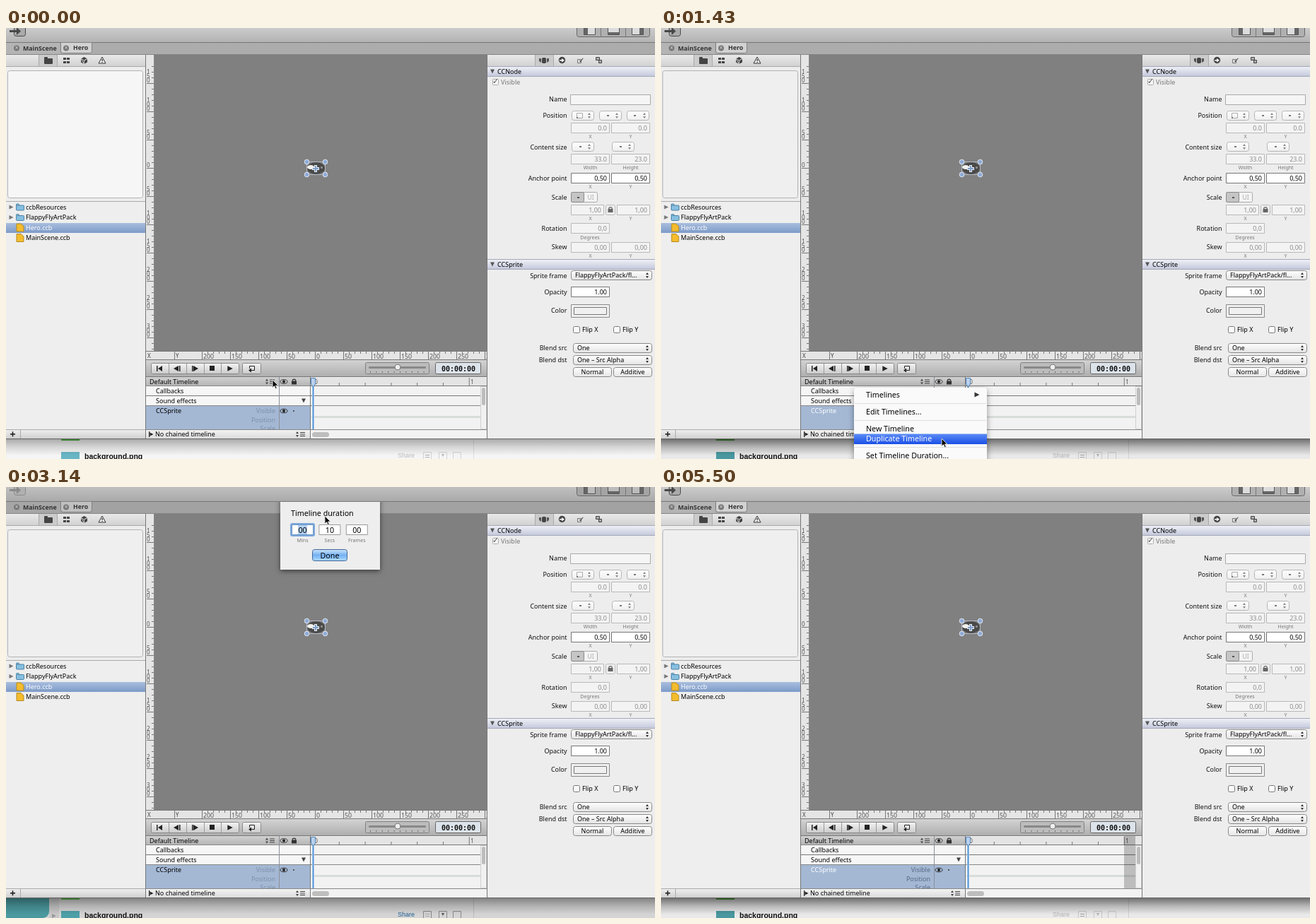
These frames come from a looping animation (918x610 px, 5.84 s). An HTML page with a canvas:

```html
<!DOCTYPE html>
<html lang="en">
<head>
<meta charset="utf-8">
<title>Timeline duration</title>
<style>
html, body { margin: 0; width: 100%; height: 100%; overflow: hidden; background: #eee; }
canvas { display: block; width: 918px; height: 610px; }
</style>
</head>
<body>
<canvas id="stage" width="918" height="610"></canvas>
<script>
const c = document.getElementById('stage').getContext('2d');
const LOOP = 5840;
const SANS = '"Noto Sans", "Open Sans", sans-serif';

// Stepped motion: [time, ...values]
const cursorSteps = [
  [0, 377, 498], [1080, 377, 501], [1260, 383, 515], [1350, 392, 541],
  [1430, 397, 581], [1520, 398, 584], [1600, 398, 590], [1690, 397, 596],
  [1780, 396, 600], [1950, 396, 601], [2580], [3050, 474, 114],
  [3140, 451, 41], [3230, 455, 50], [3310, 458, 57], [3570, 463, 68],
  [3660, 470, 84], [3750, 477, 100], [3840, 481, 110], [4010, 479, 110],
  [4100, 473, 106], [4190, 466, 100], [4280, 462, 97], [4890, 464, 106],
  [4980, 464, 119], [5120, 462, 220], [5210, 455, 380], [5300, 440, 540], [5400]
];
const menuSteps = [[0, 0], [630, 1], [2400, .45], [2490, .1], [2580, 0]];
const pickSteps = [[0, -1], [1260, 0], [1350, 1], [1430, 3], [1690, 4]];
const sheetSteps = [[0, 0], [2820, .5], [2910, 1], [4450, .9], [4540, .6], [4620, .25], [4710, 0]];
const at = (steps, t) => steps.filter(s => s[0] <= t).pop().slice(1);

function box(x, y, w, h, fill, line, r = 0) {
  c.beginPath();
  const o = line ? .5 : 0;
  c.roundRect(x + o, y + o, w - 2 * o, h - 2 * o, r);
  if (fill) { c.fillStyle = fill; c.fill(); }
  if (line) { c.strokeStyle = line; c.lineWidth = 1; c.stroke(); }
}
function shade(y, h, ...colors) {
  const g = c.createLinearGradient(0, y, 0, y + h);
  colors.forEach((k, i) => g.addColorStop(i / (colors.length - 1), k));
  return g;
}
const bar = (x, y, w, h, a, b) => box(x, y, w, h, shade(y, h, a, b));
function text(s, x, y, color = '#000', size = 9, align = 'left', font = SANS, weight = '') {
  c.font = `${weight} ${size}px ${font}`;
  c.textAlign = align;
  c.fillStyle = color;
  c.fillText(s, x, y + size * .35);
}
function poly(points, fill, line) {
  c.beginPath();
  for (let i = 0; i < points.length; i += 2) c.lineTo(points[i], points[i + 1]);
  c.closePath();
  if (fill) { c.fillStyle = fill; c.fill(); }
  if (line) { c.strokeStyle = line; c.lineWidth = 1; c.stroke(); }
}
function dot(x, y, r, fill, line) {
  c.beginPath();
  c.arc(x, y, r, 0, 7);
  if (fill) { c.fillStyle = fill; c.fill(); }
  if (line) { c.strokeStyle = line; c.lineWidth = 1; c.stroke(); }
}
const right = (x, y, s, color = '#222') => poly([x - s, y - s, x + s, y, x - s, y + s], color);
const down = (x, y, s, color = '#444') => poly([x - s, y - s, x + s, y - s, x, y + s], color);
function updown(x, y, color = '#444') {
  poly([x - 2, y - 1, x, y - 4, x + 2, y - 1], color);
  poly([x - 2, y + 1, x, y + 4, x + 2, y + 1], color);
}
function listIcon(x, y) {
  updown(x, y);
  for (let i = -3; i <= 3; i += 2.5) box(x + 4, y + i, 7, 1, '#444');
}
function eye(x, y) {
  c.beginPath();
  c.ellipse(x, y, 5, 2.8, 0, 0, 7);
  c.strokeStyle = '#333'; c.lineWidth = 1; c.stroke();
  dot(x, y, 2, '#222');
}
function lock(x, y, color = '#333') {
  box(x - 3, y - 1, 7, 5, color);
  c.beginPath();
  c.arc(x + .5, y - 1, 2.3, Math.PI, 0);
  c.strokeStyle = color; c.lineWidth = 1.2; c.stroke();
}
function arrow(x, y) {
  poly([x, y, x, y + 11, x + 2.6, y + 8.6, x + 4.4, y + 12.6, x + 6.2, y + 11.8, x + 4.5, y + 8, x + 8, y + 8], '#000', '#ddd');
}

function backdrop(mode) {
  const on = mode == 2;
  box(0, 581, 918, 29, on ? '#d4d4d4' : '#f5f5f5');
  if (on) {
    box(0, 581, 61, 29, '#4a9a9f', 0, [0, 0, 9, 0]);
    box(61, 581, 14, 29, '#c8c8c8');
    right(68, 607, 3, '#999');
  }
  box(78, 580, 26, 4, '#58b848');
  box(78, 600, 26, 10, mode ? '#4d9fa8' : '#68b5c4');
  text('background.png', 111, 606, '#111', 10.5, 'left', '"Liberation Sans", sans-serif', 'bold');
  text('Share', 554, 605, on ? '#1d5f93' : '#bbb', 9, 'left', '"Liberation Sans", sans-serif');
  for (const x of [590, 612, 632]) box(x, 600, 12, 11, null, on ? '#888' : '#d4d4d4');
  box(593, 604, 6, 1, '#aaa'); box(593, 607, 6, 1, '#aaa');
  down(618, 605, 2, on ? '#555' : '#bbb');
  box(661, 583, 1, 27, on ? '#bbb' : '#ddd');
  const a = [.32, .54, .4][mode];
  box(0, 581, 918, 24, shade(581, 24, `rgba(0,0,0,${a})`, `rgba(0,0,0,${a * .4})`, 'rgba(0,0,0,0)'));
  if (mode == 1) box(0, 581, 918, 29, 'rgba(0,0,0,.05)');
}

function toolbar(dim) {
  if (dim) bar(0, 0, 918, 20, '#bfbfbf', '#aaa');
  else bar(0, 0, 918, 20, '#cbcbcb', '#b3b3b3');
  box(0, 20, 918, 18, dim ? '#a2a2a2' : '#acacac');
  box(0, 20, 918, 1, '#777');
  box(0, 37, 918, 1, '#858585');
  const ink = dim ? '#8a8a8a' : '#484848';
  box(11, -3, 17, 15, dim ? '#b0b0b0' : '#aaa', ink, 3);
  box(5, 3, 12, 3, ink);
  poly([15, -1, 21, 4.5, 15, 10], ink);
  box(807, -6, 104, 19, dim ? '#a4a4a4' : '#b0b0b0', '#666', 3);
  for (const x of [841, 876]) box(x, 0, 1, 13, '#777');
  for (const x of [817, 851, 885]) box(x, -4, 17, 14, dim ? '#bcbcbc' : '#dcdcdc', '#555');
  box(818, 0, 5, 9, '#666'); box(852, 6, 15, 3, '#666'); box(896, 0, 5, 9, '#666');
  box(0, 21, 76, 16, dim ? '#a6a6a6' : '#b4b4b4');
  box(77, 20, 45, 16, dim ? '#c0c0c0' : '#d2d2d2', '#808080', [0, 0, 3, 3]);
  for (const x of [15, 85]) { dot(x, 28.5, 4, '#777'); text('×', x, 28.5, '#ddd', 8, 'center'); }
  text('MainScene', 24, 29, '#333', 8.8, 'left', SANS, 'bold');
  text('Hero', 95, 28, '#333', 8.8, 'left', SANS, 'bold');
}

function folder(x, y, fill, line) {
  box(x, y - 5, 5, 4, fill, line, 1);
  box(x, y - 3, 12, 8, fill, line, 1);
}

function leftPanel(mode) {
  box(0, 38, 197, 543, '#ededed');
  bar(0, 38, 197, 16, '#e9e9e9', '#d2d2d2');
  box(0, 54, 197, 1, '#aaa');
  box(46, 38, 26, 16, '#cbcbcb');
  for (const x of [46, 72]) box(x, 38, 1, 16, '#aaa');
  folder(54, 46, '#444');
  for (const x of [81, 86]) for (const y of [42, 47]) box(x, y, 4, 3, '#444');
  poly([110.5, 41, 115, 43.5, 115, 48.5, 110.5, 51, 106, 48.5, 106, 43.5], '#444');
  poly([106, 43.5, 110.5, 46, 115, 43.5, 110.5, 46, 110.5, 51], null, '#ccc');
  poly([136, 41, 141, 50, 131, 50], '#eee', '#333');
  box(135.5, 44, 1.3, 3, '#333'); box(135.5, 48, 1.3, 1, '#333');
  box(2, 60, 192, 181, mode ? '#efefef' : '#f6f6f6', '#b3b3b3', 3);
  box(0, 246, 197, 322, '#eee');
  box(0, 245, 197, 1, '#aaa');
  bar(0, 276, 197, 14, '#a9bedd', '#7d9bc8');
  ['ccbResources', 'FlappyFlyArtPack', 'Hero.ccb', 'MainScene.ccb'].forEach((s, i) => {
    const y = 253.5 + i * 14.5;
    if (i < 2) {
      right(7.5, y, 3, '#777');
      folder(14, y, '#86bfe0', '#4d82a6');
    } else {
      poly([15, y - 5.5, 21, y - 5.5, 25, y - 2, 25, y + 5.5, 15, y + 5.5], '#f4bc2d', '#b48a20');
    }
    text(s, 28, y, i == 2 ? '#fff' : '#000');
  });
  bar(0, 568, 197, 13, '#f0f0f0', '#d0d0d0');
  box(0, 568, 197, 1, '#aaa'); box(20, 568, 1, 13, '#aaa');
  box(6, 574, 7, 1.6, '#222'); box(8.7, 571.3, 1.6, 7, '#222');
  box(197, 38, 1, 543, '#777');
}

function rulers() {
  box(198, 38, 12, 420, '#e5e5e5');
  for (let k = -18; k <= 32; k++) {
    const y = 198 + k * 8, big = k % 5 == 0;
    if (y < 40 || y > 456) continue;
    box(big ? 199 : 206, y, big ? 10 : 3, 1, '#777');
    if (big) [...String(Math.abs(k) * 10)].reverse().forEach((d, i) => text(d, 199, y - 4 - i * 6, '#555', 8));
  }
  box(209, 38, 1, 420, '#888');
  box(198, 457, 482, 13, '#e5e5e5');
  box(198, 457, 482, 1, '#777');
  text('X', 200, 464, '#444', 8); text('Y', 240, 464, '#444', 8);
  box(238, 458, 1, 11, '#777');
  for (let k = -20; k <= 30; k++) {
    const x = 438 + k * 8, big = k % 5 == 0;
    box(x - 1, 458, 1, big ? 11 : 3, '#777');
    if (big) text(Math.abs(k) * 10, x + 1, 464.5, '#555', 8.8);
  }
}

function hero() {
  box(210, 38, 470, 419, '#808080');
  c.beginPath(); c.ellipse(438.5, 198.5, 12.5, 8.5, 0, 0, 7);
  c.fillStyle = '#4a4a4a'; c.fill();
  c.beginPath(); c.ellipse(431, 197, 5, 3, 0, 0, 7);
  c.fillStyle = '#f2f2ee'; c.fill();
  box(445, 196, 3, 3, '#888');
  box(425, 189, 27, 19, null, '#b3bac6');
  for (const x of [425.5, 451.5]) for (const y of [189.5, 207.5]) dot(x, y, 3.3, '#8eabd8', '#e2e8f2');
  box(433, 197, 10, 4, '#e8eef6'); box(436, 194, 4, 10, '#e8eef6');
  box(434, 198, 8, 2, '#7f9fc8'); box(437, 195, 2, 8, '#7f9fc8');
}

function playbar() {
  bar(198, 470, 482, 24, '#d3d3d3', '#adadad');
  box(198, 469, 482, 1, '#777');
  box(205, 474, 125, 16, shade(474, 16, '#f5f5f5', '#c9c9c9'), '#888', 2);
  for (const x of [230, 255, 280, 304]) box(x, 475, 1, 14, '#999');
  box(213, 478, 1.5, 8, '#222'); poly([221, 478, 215, 482, 221, 486], '#222');
  poly([244, 478, 237, 482, 244, 486], '#222'); box(245, 478, 1.5, 8, '#222');
  box(263, 478, 1.5, 8, '#222'); poly([265, 478, 272, 482, 265, 486], '#222');
  box(288, 478, 7, 7, '#222'); right(317, 482, 3.7);
  box(334, 474, 27, 16, shade(474, 16, '#f5f5f5', '#c9c9c9'), '#888', 2);
  box(344, 478, 8, 7, null, '#222'); box(342, 482, 5, 4, '#ddd');
  poly([343, 484.5, 347, 481.5, 347, 487.5], '#222');
  box(508, 473, 91, 17, '#bcbcbc', '#808080', 2);
  box(513, 479, 81, 3, '#888', 0, 1);
  for (let x = 515; x < 595; x += 8.4) box(x, 486, 1, 2, '#666');
  dot(554, 480, 4, '#eee', '#777');
  box(607, 473, 65, 17, '#dce3ea', '#666', 2);
  text('00:00:00', 640, 482, '#111', 10, 'center', '"DejaVu Sans Mono", monospace', 'bold');
}

function timeline(active, short) {
  box(198, 494, 482, 87, '#f2f2f2');
  bar(198, 494, 233, 13, '#d0d0d0', '#b4b4b4');
  box(198, 493, 482, 1, '#777');
  text('Default Timeline', 203, 500.5);
  listIcon(369, 500.5);
  eye(393, 500.5); lock(407, 500.5);
  box(198, 507, 233, 28, '#f6f6f6');
  box(198, 506, 233, 1, '#888');
  text('Callbacks', 212, 513.5);
  text('Sound effects', 212, 527.5);
  down(421, 527.5, 3);
  box(198, 534, 233, 35, '#a4b8d4');
  text('CCSprite', 212, 542, active ? '#fff' : '#000');
  const soft = active ? '#566984' : '#7f8fa9';
  c.save();
  c.beginPath(); c.rect(198, 534, 233, 34); c.clip();
  ['Visible', 'Position', 'Scale'].forEach((s, i) => text(s, 381, 542 + i * 12.5, soft, 9, 'right'));
  c.restore();
  eye(393, 542); box(406, 541, 2, 2, '#555');
  box(198, 520, 473, 1, '#777'); box(198, 534, 473, 1, '#888');
  box(386, 494, 1, 74, '#8a8f98');
  box(431, 495, 249, 11, '#e4e4e4');
  box(431, 506, 249, 1, '#777');
  for (let i = 1; i <= 6; i++) box(434 + i * 36.8, i == 6 ? 495 : 502, 1, i == 6 ? 11 : 4, '#777');
  text('0', 436, 501, '#555', 8.5); text('1', 657, 501, '#555', 8.5);
  box(432, 549, 239, 3, '#d9ddd9');
  box(671, 507, 9, 61, '#f1f1f1', '#d0d0d0');
  box(673, 509, 5, 25, '#bcbcbc', 0, 2.5);
  if (short) box(655, 494, 16, 74, 'rgba(0,0,0,.22)');
  box(430, 494, 1, 87, '#777');
  box(433, 495, 3, 73, '#9fc7ee'); box(434, 495, 1, 73, '#4a8fd0');
  poly([431.5, 495.5, 437.5, 495.5, 437.5, 504, 434.5, 508, 431.5, 504], '#b9d2ee', '#5283b5');
  box(198, 568, 482, 1, '#888');
  bar(198, 569, 232, 12, '#f2f2f2', '#dcdcdc');
  box(202, 571, 1.3, 8, '#222'); right(206, 575, 2.5);
  text('No chained timeline', 211, 575);
  listIcon(412, 575);
  box(433, 572, 24, 7, '#bebebe', 0, 3.5);
}

function field(x, y, w, value, on) {
  box(x, y, w, 15, on ? '#fff' : '#f3f3f3', on ? '#777' : '#b9b9b9');
  text(value, x + w - 4, y + 8, on ? '#000' : '#8c8c8c', 9, 'right');
}
function pop(x, y, w, s) {
  box(x, y, w, 14, shade(y, 14, '#fff', s ? '#e3e3e3' : '#eee'), s ? '#888' : '#b5b5b5', 3);
  if (s) text(s, x + 6, y + 7);
  updown(x + w - 7, y + 7, s ? '#333' : '#8a8a8a');
}
function section(y, s) {
  bar(681, y, 237, 13, '#eef0f6', '#c5c9dc');
  box(681, y - 1, 237, 1, '#a4a7b8'); box(681, y + 13, 237, 1, '#a4a7b8');
  down(688, y + 6.5, 3, '#555');
  text(s, 695, y + 7);
}

function rightPanel() {
  box(680, 38, 238, 543, '#ededed');
  bar(680, 38, 238, 16, '#e9e9e9', '#d2d2d2');
  box(748, 38, 26, 16, '#cbcbcb');
  for (const x of [748, 774]) box(x, 38, 1, 16, '#aaa');
  poly([754, 43, 757, 43, 757, 49, 754, 47], '#555'); box(758, 42, 6, 8, '#444', 0, 2); poly([765, 43, 768, 43, 768, 47, 765, 49], '#555');
  dot(786.5, 45.5, 4.7, '#444'); box(783, 45, 4, 1.5, '#fff'); poly([786, 43, 790, 45.7, 786, 48.5], '#fff');
  box(808, 44, 6, 6, null, '#777'); text('✓', 810, 45, '#333', 10, 'left', '"DejaVu Sans", sans-serif');
  box(834, 41, 6, 5, '#aaa', '#444'); box(838, 45, 5, 5, '#aaa', '#444');
  section(55, 'CCNode');
  box(688, 72, 9, 9, '#f8f8f8', '#aaa', 1);
  text('✓', 688, 75, '#555', 11, 'left', '"DejaVu Sans", sans-serif');
  text('Visible', 700, 77, '#777');
  const labels = { Name: 101, Position: 124, 'Content size': 168.5, 'Anchor point': 212.5, Scale: 240,
    Rotation: 284, Skew: 310, 'Sprite frame': 350.5, Opacity: 374, Color: 400, 'Blend src': 453, 'Blend dst': 469.5 };
  for (const s in labels) text(s, 793.5, labels[s], '#111', 9, 'right');
  box(798, 94, 114, 15, '#f5f5f5', '#aaa');
  for (const x of [800, 839, 878]) pop(x, 117, 32);
  box(807, 120, 9, 8, null, '#aaa'); box(807, 126, 2, 2, '#777');
  box(850, 123, 3, 2, '#777'); box(888, 123, 3, 2, '#777');
  for (const x of [800, 857]) { pop(x, 161, 32); box(x + 11, 167, 3, 2, '#777'); }
  [[134, '0.0', '0.0', 'X', 'Y'], [178, '33.0', '23.0', 'Width', 'Height'], [205, '0,50', '0,50', 'X', 'Y'],
   [250, '1,00', '1,00', 'X', 'Y'], [303, '0,00', '0,00', 'X', 'Y']].forEach(([y, a, b, p, q], i) => {
    const w = i == 3 ? 47 : 55;
    field(799, y, w, a, i == 2);
    field(911 - w, y, w, b, i == 2);
    text(p, 826.5, y + 20, '#777', 7, 'center');
    text(q, 883.5, y + 20, '#777', 7, 'center');
  });
  box(799, 232, 38, 15, '#f4f4f4', '#aaa', 2);
  box(799, 232, 19, 15, '#c5c5c5', '#888', 2); box(808, 239, 3, 2, '#555');
  text('UI', 827, 240, '#aaa', 8.5, 'center');
  box(848, 250, 14, 15, '#eee', '#bbb', 2); lock(854.5, 257, '#666');
  field(799, 276, 55, '0,0');
  text('Degrees', 826, 296.5, '#777', 7, 'center');
  section(328, 'CCSprite');
  pop(799, 343, 115, 'FlappyFlyArtPack/fl...');
  field(799, 366, 55, '1.00', true);
  box(799, 391, 55, 19, '#f0f0f0', '#888'); box(803, 395, 47, 11, '#f0f0f0', '#777');
  [[802, 'Flip X'], [859, 'Flip Y']].forEach(([x, s]) => {
    box(x, 422, 10, 10, '#fafafa', '#777', 2);
    text(s, x + 13, 427);
  });
  pop(802, 446, 112, 'One'); pop(802, 463, 112, 'One – Src Alpha');
  [[802, 'Normal'], [859, 'Additive']].forEach(([x, s]) => {
    box(x, 480, 55, 14, shade(480, 14, '#fff', '#e5e5e5'), '#888', 3);
    text(s, x + 27.5, 487, '#000', 9, 'center');
  });
  box(680, 38, 1, 543, '#777');
}

function menu(alpha, pick) {
  c.save();
  c.globalAlpha = alpha;
  c.shadowColor = 'rgba(0,0,0,.4)'; c.shadowBlur = 9; c.shadowOffsetY = 3;
  box(273, 509, 188, 110, '#fafafa', 0, 4);
  c.shadowColor = 'transparent';
  for (const y of [531, 555, 593]) box(274, y, 186, 1, '#dedede');
  ['Timelines', 'Edit Timelines...', 'New Timeline', 'Duplicate Timeline', 'Set Timeline Duration...'].forEach((s, i) => {
    const y = [519, 543, 567, 581.5, 605.5][i], on = i == pick;
    if (on) bar(273, y - 7, 188, 14.5, '#5b8bf6', '#1a4fe6');
    text(s, 290, y, on ? '#fff' : '#000', 10.7);
    if (!i) right(447, y, 3.5, on ? '#fff' : '#333');
  });
  c.restore();
}

function sheet(open, t) {
  const secs = t >= 3310, value = t >= 4010 ? '01' : '10';
  c.save();
  c.beginPath(); c.rect(370, 21, 180, 130); c.clip();
  c.translate(0, (open - 1) * 98);
  c.shadowColor = 'rgba(0,0,0,.55)'; c.shadowBlur = 7; c.shadowOffsetY = 2;
  box(388, 15, 141, 102, '#eee');
  c.shadowColor = 'transparent';
  text('Timeline duration', 403, 37.5, '#000', 10.7);
  ['00', value, '00'].forEach((s, i) => {
    const x = 404 + i * 38.4, on = i == (secs ? 1 : 0);
    if (on) box(x - 2, 51, 35, 19, '#79a8dc', 0, 3);
    box(x, 53, 31, 15, '#fff', on ? '#6f94bf' : '#999');
    if (on && value == '10') box(x + 9, 54, 13, 13, '#b3d2f5');
    text(s, x + 15.5, 61, '#000', 10.7, 'center');
    text(['Mins', 'Secs', 'Frames'][i], x + 15.5, 75.5, '#777', 7.1, 'center');
  });
  const push = t >= 4280;
  box(433, 88, 50, 17, shade(88, 17, push ? '#94bce9' : '#d3e6fb', push ? '#4d8ddc' : '#74b1f2', push ? '#82bbef' : '#b2dcff'), '#426896', 3);
  text('Done', 458, 97, '#000', 10.7, 'center');
  c.restore();
}

function draw(now) {
  const t = now % LOOP;
  const mode = t < 810 ? 0 : t < 2670 || t >= 5300 ? 1 : 2;
  backdrop(mode);
  toolbar(t >= 2820 && t < 5300);
  leftPanel(mode);
  hero();
  rulers();
  playbar();
  timeline(mode == 1, t >= 4980);
  rightPanel();
  box(0, 581, 918, 1, '#666');
  const [shown] = at(menuSteps, t), [open] = at(sheetSteps, t), [x, y] = at(cursorSteps, t);
  if (shown) menu(shown, at(pickSteps, t)[0]);
  if (open) sheet(open, t);
  if (x) arrow(x, y);
}

function frame() {
  draw(performance.now());
  requestAnimationFrame(frame);
}
frame();
</script>
</body>
</html>
```
